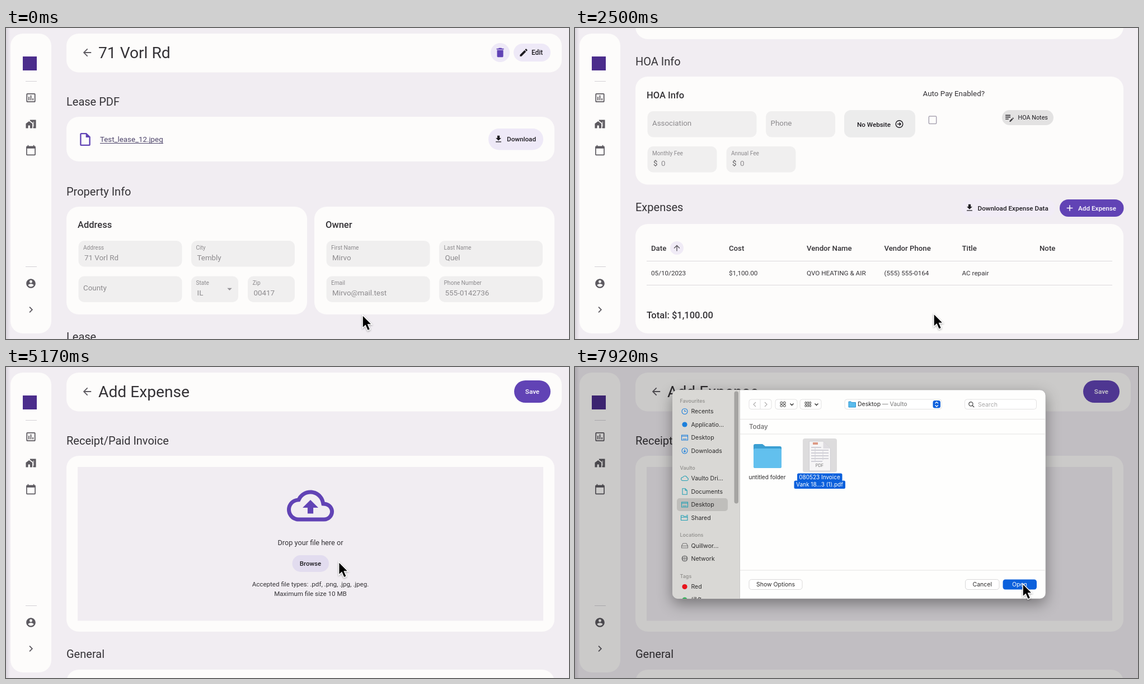
Write an HTML page that moves like this. It is 1006 by 557 pixels and loops after 8000 ms.

```html
<!DOCTYPE html>
<html lang="en">
<head>
<meta charset="utf-8">
<title>Lease manager</title>
<style>
  html, body { margin: 0; width: 100%; height: 100%; overflow: hidden; background: #f1edf2; }
  svg { display: block; width: 100vw; height: 100vh; font-family: Roboto, sans-serif; }
  text { white-space: pre; }
  .mid { text-anchor: middle; }
  .med { font-weight: 500; }
  #sheet { font-family: Inter, "Noto Sans CJK SC", "Noto Sans CJK", sans-serif; }
  .panel { filter: drop-shadow(0 9px 13px rgba(0, 0, 0, .38)); }
  #cursor { filter: drop-shadow(0 1.5px 1.5px rgba(0, 0, 0, .35)); }
</style>
</head>
<body>
<svg id="stage" viewBox="0 0 1006 557"></svg>
<script>
const PAGE = '#f1edf2', CARD = '#fdfcfb', FIELD = '#f0efef', INK = '#343236', GREY = '#8c8a8d',
      PURPLE = '#6143b5', LILAC = '#eee9f7', BLUE = '#0b60dc';

const ICONS = {
  chart: 'M9 17H7v-7h2v7zm4 0h-2V7h2v10zm4 0h-2v-4h2v4zm2 2H5V5h14v14zm0-16H5c-1.1 0-2 .9-2 2v14c0 1.1.9 2 2 2h14c1.1 0 2-.9 2-2V5c0-1.1-.9-2-2-2z',
  homes: 'M1 11v10h5v-6h4v6h5V11L8 6zM10 3v1.97l7 5V11h2v2h-2v2h2v2h-2v4h6V3H10zm9 6h-2V7h2v2z',
  calendar: 'M20 3h-1V1h-2v2H7V1H5v2H4c-1.1 0-2 .9-2 2v16c0 1.1.9 2 2 2h16c1.1 0 2-.9 2-2V5c0-1.1-.9-2-2-2zm0 18H4V8h16v13z',
  account: 'M12 2C6.48 2 2 6.48 2 12s4.48 10 10 10 10-4.48 10-10S17.52 2 12 2zm0 3c1.66 0 3 1.34 3 3s-1.34 3-3 3-3-1.34-3-3 1.34-3 3-3zm0 14.2c-2.5 0-4.71-1.28-6-3.22.03-1.99 4-3.08 6-3.08 1.99 0 5.97 1.09 6 3.08-1.29 1.94-3.5 3.22-6 3.22z',
  chevron: 'M10 6L8.59 7.41 13.17 12l-4.58 4.59L10 18l6-6z',
  back: 'M20 11H7.83l5.59-5.59L12 4l-8 8 8 8 1.41-1.41L7.83 13H20v-2z',
  trash: 'M6 19c0 1.1.9 2 2 2h8c1.1 0 2-.9 2-2V7H6v12zM19 4h-3.5l-1-1h-5l-1 1H5v2h14V4z',
  pencil: 'M3 17.25V21h3.75L17.81 9.94l-3.75-3.75L3 17.25zM20.71 7.04c.39-.39.39-1.02 0-1.41l-2.34-2.34c-.39-.39-1.02-.39-1.41 0l-1.83 1.83 3.75 3.75 1.83-1.83z',
  download: 'M19 9h-4V3H9v6H5l7 7 7-7zM5 18v2h14v-2H5z',
  event: 'M17 12h-5v5h5v-5zM16 1v2H8V1H6v2H5c-1.1 0-2 .9-2 2v14c0 1.1.9 2 2 2h14c1.1 0 2-.9 2-2V5c0-1.1-.9-2-2-2h-1V1h-2zm3 18H5V8h14v11z',
  note: 'M3 10h11v2H3v-2zm0-2h11V6H3v2zm0 8h7v-2H3v2zm15-3.1.7-.7c.4-.4 1-.4 1.4 0l.7.7c.4.4.4 1 0 1.4l-.7.7-2.1-2.1zm-.7.7L12 18.9V21h2.1l5.3-5.3-2.1-2.1z',
  cloud: 'M19.35 10.04C18.67 6.59 15.64 4 12 4 9.11 4 6.6 5.64 5.35 8.04 2.34 8.36 0 10.91 0 14c0 3.31 2.69 6 6 6h13c2.76 0 5-2.24 5-5 0-2.64-2.05-4.78-4.65-4.96zM19 18H6c-2.21 0-4-1.79-4-4 0-2.05 1.53-3.76 3.56-3.97l1.07-.11.5-.95C8.08 7.14 9.94 6 12 6c2.62 0 4.88 1.86 5.39 4.43l.3 1.5 1.53.11c1.56.1 2.78 1.41 2.78 2.96 0 1.65-1.35 3-3 3zM8 13h2.55v3h2.9v-3H16l-4-4z',
  file: 'M14 2H6c-1.1 0-2 .9-2 2v16c0 1.1.9 2 2 2h12c1.1 0 2-.9 2-2V8l-6-6zM6 20V4h7v5h5v11H6z',
  drop: 'M7 10l5 5 5-5z',
  up: 'M11 20V7.83l-5.59 5.59L4 12l8-8 8 8-1.41 1.41L13 7.83V20z',
  plus: 'M19 13h-6v6h-2v-6H5v-2h6V5h2v6h6z'
};

// All text is placed by the middle of its capitals.
const text = (x, y, s, size, fill = INK, cls = '') =>
  `<text x="${x}" y="${y + size * .355}" font-size="${size}" fill="${fill}" class="${cls}">${s.replace(/&/g, '&amp;')}</text>`;
const box = (x, y, w, h, r, fill, extra = '') =>
  `<rect x="${x}" y="${y}" width="${w}" height="${h}" rx="${r}" fill="${fill}" ${extra}/>`;
const icon = (name, x, y, k, fill = '#5d5a60') =>
  `<path transform="translate(${x} ${y}) scale(${k}) translate(-12 -12)" d="${ICONS[name]}" fill="${fill}" fill-rule="evenodd"/>`;
const line = (d, color, w = 1, extra = '') => `<path d="${d}" fill="none" stroke="${color}" stroke-width="${w}" ${extra}/>`;
const group = (id, body, dy = 0) => `<g id="${id}" transform="translate(0 ${dy})">${body}</g>`;
const card = (x, y, w, h) => box(x, y, w, h, 22, CARD);
const section = (y, s) => text(108, y, s, 20);
const heading = (x, y, s) => text(x, y, s, 16.5, INK, 'med');

function field(x, y, w, label, value, money) {
  let out = box(x, y, w, 46.5, 10, FIELD);
  if (value === undefined) return out + text(x + 8.5, y + 21, label, 13.35, GREY);
  out += text(x + 8.5, y + 12, label, 10.1, GREY);
  if (money) out += text(x + 10.5, y + 30, '$', 13.35, '#5c5a5d');
  return out + text(x + (money ? 24.5 : 10.5), y + 30, value, 13.35, GREY);
}

function service(y, name, first, chipW, note) {
  return heading(128, y, name) + field(129.5, y + 29, 195, first) + field(341, y + 29, 124, 'Phone') +
    box(481, y + 27, 127, 49, 12, '#ececec') + text(504, y + 52.5, 'No Website', 11.7, '#1d1b20', 'med') +
    `<circle cx="579.5" cy="${y + 52}" r="6.3" fill="none" stroke="#1d1b20" stroke-width="1.4"/>` +
    line(`M576 ${y + 52}h6m-2.6-2.7l2.7 2.7-2.7 2.7`, '#1d1b20', 1.4) +
    box(632.3, y + 38, 13.4, 13.4, 1.5, 'none', 'stroke="#aaa5b3" stroke-width="1.5"') +
    box(763, y + 27, chipW, 27, 13.5, '#e3e2e2') + icon('note', 776.5, y + 40.5, .82, '#3a383c') +
    text(791.5, y + 40.5, note, 10.8, '#1d1b20');
}

const autoPay = y => text(621.5, y - 3, 'Auto Pay Enabled?', 13.4);

function header(title, right) {
  return card(108, 10, 885, 69.5) + icon('back', 145, 44, .9) + text(165, 44, title, 28.2) + right;
}

function sidebar() {
  const glyphs = [['chart', 125, .9], ['homes', 172, .82], ['calendar', 219, .84], ['account', 457.5, .83], ['chevron', 504.5, .9]];
  return box(0, 0, 8, 557, 0, 'url(#edge)') + box(8, 10, 73, 537, 22, CARD) + box(30, 51, 25, 25, 0, '#4b2d8c') +
    line('M35 95.5h20M35 427.5h20', '#d3d0d5') + glyphs.map(([n, y, k]) => icon(n, 44.5, y, k)).join('');
}

function leasePage() {
  const street = '71 Vorl Rd';
  const pdf = section(132, 'Lease PDF') + card(108, 159, 872, 80) + icon('file', 141.5, 199.5, 1.16, PURPLE) +
    text(168, 199, 'Test_lease_12.jpeg', 13.3, '#4b4268') + line('M168 206.5h113', '#4b4268') +
    box(862, 180, 98, 38.5, 19, LILAC) + icon('download', 880, 199, .7, '#1d1b20') + text(895, 199, 'Download', 11.7, '#1d1b20', 'med');
  const property = section(292.5, 'Property Info') + card(108, 320, 430, 193) + card(551, 320, 429, 193) +
    heading(128, 352.5, 'Address') + heading(571, 352.5, 'Owner') +
    field(129.5, 381, 185, 'Address', street) + field(331, 381, 185, 'City', 'Tembly') +
    field(129.5, 444.5, 185, 'County') + field(331, 444.5, 84, 'State', 'IL') + field(432, 444.5, 84, 'Zip', '00417') +
    icon('drop', 399.5, 467.5, .85, '#98969a') +
    field(572.5, 381, 185, 'First Name', 'Mirvo') + field(774, 381, 185, 'Last Name', 'Quel') +
    field(572.5, 444.5, 185, 'Email', 'Mirvo@mail.test') + field(774, 444.5, 185, 'Phone Number', '555-0142736');
  const lease = section(156, 'Lease') + card(108, 183, 872, 194) + heading(128, 216, 'Lease') +
    field(129.5, 245, 265, 'Lease Start', '08/15/2024') + field(411.5, 245, 265, 'Lease End', '08/15/2025') +
    field(693.5, 245, 265.5, 'Due Date', '1') + icon('event', 378, 267.5, .83, '#858387') + icon('event', 660, 267.5, .83, '#858387') +
    field(129.5, 308.5, 124, 'Rent', '8888', true) + field(270.5, 308.5, 124, 'Security Deposit', '8888', true);
  const tenants = section(416, 'Tenants') + card(108, 444, 872, 130) + heading(128, 476.5, 'Tenant 1') +
    [['First Name', 'Tolvi'], ['Last Name', 'Ost'], ['Email', 'SorvKelm@mail.test'], ['Phone Number', '000-555-0147']]
      .map(([k, v], i) => field(129.5 + i * 211.4, 505, 195, k, v)).join('');
  const utilities = section(-73, 'Utilities') + card(108, -45, 872, 440) + autoPay(-12.5) +
    [['Electricity', 117], ['Water', 98], ['Gas', 89], ['Trash', 97]]
      .map(([n, w], i) => service(-12.5 + i * 103.5, n, 'Company', w, n + ' Notes')).join('');
  const cols = [136, 275, 414, 552.5, 691.5, 830];
  const row = (y, cells, size, cls) => cells.map((c, i) => text(cols[i], y, c, size, INK, cls)).join('');
  const end = section(60, 'HOA Info') + card(108, 87, 872, 193.5) + autoPay(120) +
    service(120, 'HOA Info', 'Association', 92, 'HOA Notes') +
    field(129.5, 212, 124, 'Monthly Fee', '0', true) + field(270.5, 212, 124, 'Annual Fee', '0', true) +
    section(320.5, 'Expenses') + box(690, 307, 168, 31, 15.5, '#f1ecf6') + icon('download', 705, 322, .7, '#1d1b20') +
    text(719.5, 322.5, 'Download Expense Data', 11.7, '#1d1b20', 'med') +
    box(866, 307, 114.5, 31, 15.5, PURPLE, 'id="add"') + icon('plus', 884, 322.5, .76, '#fff') +
    text(899, 322.5, 'Add Expense', 11.7, '#fff', 'med') +
    card(108, 351, 872, 196) + `<circle cx="182" cy="394" r="12" fill="#f0ebf6"/>` + icon('up', 182, 394, .68) +
    row(394, ['Date', 'Cost', 'Vendor Name', 'Vendor Phone', 'Title', 'Note'], 13.2, 'med') +
    row(439, ['05/10/2023', '$1,100.00', 'QVO HEATING & AIR', '(555) 555-0164', 'AC repair'], 11.7, '') +
    line('M128 417.5h832M128 460.5h832', '#dbd9dc') + heading(128, 514, 'Total: $1,100.00');
  const tools = `<circle cx="883" cy="44" r="17" fill="${LILAC}"/>` + icon('trash', 883, 44, .92, PURPLE) +
    box(907, 28, 66, 32, 16, LILAC) + icon('pencil', 925, 44, .74, '#1d1b20') + text(939, 44, 'Edit', 11.9, '#1d1b20', 'med');
  return group('scroll', pdf + property + group('lease', lease + tenants, 397) +
    group('utilities', utilities, 1083) + group('end', end, 1458)) + group('bar', header(street, tools));
}

function expensePage() {
  const save = box(908, 24, 65, 40, 20, PURPLE) + text(940.5, 44, 'Save', 11.7, '#fff', 'med mid');
  return header('Add Expense', save) + section(132, 'Receipt/Paid Invoice') + card(108, 159, 872, 315) +
    box(128, 179, 832, 275.5, 0, PAGE) + icon('cloud', 544, 248.5, 3.5, PURPLE) +
    text(544, 314, 'Drop your file here or', 12.7, INK, 'mid') +
    box(511.5, 337, 65.5, 30, 15, '#e2dcef', 'id="browse"') + text(544, 352, 'Browse', 11.5, '#1d1b20', 'med mid') +
    text(544, 389, 'Accepted file types: .pdf, .png, .jpg, .jpeg.', 11.6, INK, 'mid') +
    text(544, 405.5, 'Maximum file size 10 MB', 11.6, INK, 'mid') +
    section(514, 'General') + card(108, 542, 872, 80);
}

function fileSheet() {
  const dark = '#2b2a2a', faint = '#8f8e8b', sky = '#1b7fdc', teal = '#23a0b4';
  const shapes = {
    clock: 'M201 0a5 5 0 1 1-10 0a5 5 0 1 1 10 0M196-3v3h2.5',
    screen: 'M190.5-4.5h11v9h-11zM190.5-2.5h11M192.5 2.5h7',
    down: 'M201 0a5 5 0 1 1-10 0a5 5 0 1 1 10 0M196-2.8v5.2m-2-2l2 2 2-2',
    cloud: 'M192.5 4h7.5a2.7 2.7 0 0 0 .3-5.3a4 4 0 0 0-7.5-.7a3 3 0 0 0-.3 6z',
    page: 'M192-5.3h5l3.2 3.2v7.4h-8.2zM197-5.3v3.2h3.2',
    folder: 'M189.5 4.5v-8.5h4l1 1.5h6.5v7zM189.5-.7h11.5M199-4.5h3',
    drive: 'M190.5 0l2.5-4h6l2.5 4v4h-11zM190.5 .5h11',
    globe: 'M201 0a5 5 0 1 1-10 0a5 5 0 1 1 10 0M191 0h10M196-5v10M193.5-4q-2 4 0 8M198.5-4q2 4 0 8'
  };
  const item = (y, s, shape, color) => text(207.5, y, s, 10.5, dark) + (shape
    ? line(shapes[shape], color, 1.1, `transform="translate(0 ${y})"`)
    : `<circle cx="196" cy="${y}" r="4.6" fill="${color}"/>`);
  const label = (y, s) => text(187.5, y, s, 9, faint, 'med');
  const side = box(174, 41, 120.5, 374, 0, '#d9d8d5') + box(182, 235, 91, 23, 5, '#bfbebb') +
    label(61, 'Favourites') + item(79.5, 'Recents', 'clock', sky) + item(103, 'Applicatio...', '', sky) +
    item(126.5, 'Desktop', 'screen', sky) + item(150, 'Downloads', 'down', sky) +
    label(181, 'Vaulto') + item(199.5, 'Vaulto Dri...', 'cloud', teal) + item(223, 'Documents', 'page', teal) +
    item(246.5, 'Desktop', 'screen', teal) + item(270, 'Shared', 'folder', teal) +
    label(301, 'Locations') + item(320, 'Quillwor...', 'drive', '#777') + group('network', item(343, 'Network', 'globe', '#777')) +
    group('tags', label(375, 'Tags') + item(393.5, 'Red', '', '#e8141c') + item(417, '绿色', '', '#2fb457') + item(440, '红色', '', '#e8141c')) +
    box(284.5, 43.5, 7.5, 201, 3.7, '#a5a4a2', 'id="thumb"');
  const button = (x, w, s) => box(x, 380.5, w, 18, 4.5, '#fff', 'stroke="#d9d8d8"') + text(x + w / 2, 389.5, s, 10.5, dark, 'mid');
  const frame = 'stroke="#e2e1e1"';
  const grid = (x, n, step, size) => Array.from({ length: n * 2 }, (_, i) =>
    box(x + i % n * step, 62.5 + Math.floor(i / n) * 5, size, 3.6, .5, 'none', 'stroke="#444"')).join('');
  const tools = box(311, 58, 40, 17.5, 4, '#fff', frame) + line('M331 58v17.5', '#e2e1e1') +
    line('M323 63l-4 4 4 4M339 63l4 4-4 4', '#b0afaf', 1.2) +
    box(358, 58, 39, 17.5, 4, '#fff', frame) + box(402, 58, 38, 17.5, 4, '#fff', frame) +
    grid(367, 2, 5.5, 3.6) + grid(411, 3, 4, 2.5) + line('M384.5 65.5l3 3 3-3M428.5 65.5l3 3 3-3', '#333', 1.4) +
    box(482, 58, 173, 17.5, 4, '#fff', frame) + line('M489 62h4l1.5 1.5h7v8.5h-12.5z', '#2b93cf', 1, 'style="fill:#5bbcec"') +
    text(505, 66.5, `Desktop<tspan fill="#777"> — Vaulto</tspan>`, 10.5, dark) +
    box(639.5, 60, 13.5, 13.5, 3.5, BLUE) + line('M643.5 65.3l2.7-2.7 2.7 2.7M643.5 68.3l2.7 2.7 2.7-2.7', '#fff', 1.3) +
    box(696.5, 58, 128, 17.5, 4, '#fff', frame) + line('M711 66.3a3.6 3.6 0 1 1-7.2 0a3.6 3.6 0 1 1 7.2 0M710.2 69l3 3', '#444', 1.2) +
    text(720, 67, 'Search', 10.5, '#a9a8a8');
  const folder = `<path d="M319 141q0-3 3-3h13l5 4h26q3 0 3 3v33q0 3-3 3h-44q-3 0-3-3z" fill="#3b9fd2"/>` + box(319, 146, 50, 35, 3, '#62c0ee');
  const doc = `<path d="M418.5 133h25l13 13v40h-38z" fill="#f6f5f6" stroke="#cfcdd2"/><path d="M443.5 133v13h13z" fill="#dedce0"/>` +
    box(425, 135, 9, 4, 0, '#dd9a85') + line('M422 144h18M422 149h31M422 154h31M422 159h31M422 164h31M422 169h20', '#c3c2cc', 1.5) +
    line('M429 144v24M443 149v18', '#d4d3da') + text(437, 176, 'PDF', 7.5, '#777', 'mid');
  return `<clipPath id="round">${box(174, 41, 667, 374, 10, '#000')}</clipPath>` +
    box(174, 41, 667, 374, 10, '#fefefd', 'class="panel" stroke="#aaa8aa" stroke-width=".6"') +
    `<g clip-path="url(#round)">${side}${line('M294.5 41v374', '#cbcac8')}${line('M295 93.5h546M295 120h546M295 364h546', '#e4e3e2')}</g>` +
    tools + text(311, 106.5, 'Today', 11.5, '#6d6c6c', 'med') +
    group('picked', box(407, 128, 61, 60.5, 4, '#dddcdd') + box(397, 190.5, 80.5, 14, 2.5, BLUE) + box(391.5, 203.5, 91.5, 14.5, 2.5, BLUE)) +
    folder + text(343.5, 197.5, 'untitled folder', 10.1, dark, 'mid') +
    group('waiting', text(344.5, 209.5, 'Waiting to Upload', 8.5, '#a3a2a2', 'mid')) + doc +
    group('fileName', text(437, 197.5, '080523 Invoice', 10, 'inherit', 'mid') + text(437, 210.5, 'Vank 18...3 (1).pdf', 10, 'inherit', 'mid')) +
    button(311, 95, 'Show Options') + button(697.5, 60.5, 'Cancel') +
    box(764.5, 380.5, 60.5, 18, 4.5, BLUE, 'id="openBox"') + group('openText', text(794.5, 389.5, 'Open', 10.5, 'inherit', 'mid'));
}

const cursor = `<path id="arrow" d="M0 0V23.5L5.2 18.7 9.2 28 13.7 26 9.8 17H16.8z" stroke="#fff" stroke-width="1.5"/>
  <g id="hand" stroke="#111" stroke-width="1.5" stroke-linejoin="round"><path fill="#fff" d="M-1.5 2.5q1-3.5 4-1.5l4.5 9q2.5-2 4 .5q2.5-1.5 4 1q3-1 3.5 2l1.2 6q.5 3-1 6l-10 2.5-10.5-9q-3-3.5 .5-4.2l5 2.5z"/><path d="M8.5 17l2 5M11.7 16l2 5M15 15.5l1.5 4.5"/></g>`;

document.getElementById('stage').innerHTML =
  `<defs><linearGradient id="edge"><stop stop-color="#dad5dd"/><stop offset="1" stop-color="${PAGE}"/></linearGradient></defs>` +
  box(0, 0, 1006, 557, 0, PAGE) + group('leasePage', leasePage()) + group('expensePage', expensePage()) + sidebar() +
  box(0, 0, 1006, 557, 0, '#000', 'id="dim"') + group('sheet', fileSheet()) + group('cursor', cursor);

const LOOP = 8000, STEP = 1000 / 12;
const SCROLL_START = 866.4, SCROLL_TIME = 1336, SCROLL_END = 1458;
const SWITCH = 4160, SHEET = 6030, REFRESH = 6600, PICK = 7150;
const MOVES = [[2420, 637, 514], [3500, 932, 331], [4450, 932, 331], [5400, 539, 352], [6600, 539, 352],
               [7050, 437, 158], [7220, 437, 158], [7720, 800, 388]];

const clamp = v => Math.min(1, Math.max(0, v));
const ease = v => (1 - Math.cos(Math.PI * clamp(v))) / 2;
const el = id => document.getElementById(id);
const set = (id, name, value) => el(id).setAttribute(name, value);
const show = (id, on) => set(id, 'visibility', on ? 'inherit' : 'hidden');
const shift = (id, x, y) => set(id, 'transform', `translate(${x} ${y})`);

function pointer(t) {
  let [, x, y] = MOVES[0];
  for (let i = 1; i < MOVES.length; i++) {
    const [t0, x0, y0] = MOVES[i - 1], [t1, x1, y1] = MOVES[i];
    if (t < t0) break;
    const p = ease((t - t0) / (t1 - t0));
    x = x0 + (x1 - x0) * p;
    y = y0 + (y1 - y0) * p;
  }
  return [x, y];
}

function render(t) {
  const scroll = SCROLL_END * ease((t - SCROLL_START) / SCROLL_TIME);
  shift('scroll', 0, -Math.round(scroll));
  shift('bar', 0, Math.min(0, 800 - scroll));
  show('leasePage', t < SWITCH);
  show('expensePage', t >= SWITCH);

  const onAdd = t > 3380 && t < SWITCH, onBrowse = t > 5250;
  set('add', 'fill', onAdd ? '#45287f' : PURPLE);
  set('browse', 'fill', onBrowse ? '#8d8a92' : '#e2dcef');

  const p = clamp((t - SHEET) / 400);
  set('dim', 'opacity', .2 * p);
  set('sheet', 'opacity', p ** .8);
  shift('sheet', 0, -37 * (1 - p));
  const fresh = t >= REFRESH, picked = t >= PICK;
  show('network', fresh);
  shift('tags', 0, fresh ? 0 : -23.5);
  set('thumb', 'height', fresh ? 201 : 208);
  show('waiting', !fresh);
  show('picked', picked);
  show('openBox', picked);
  set('fileName', 'fill', picked ? '#fff' : '#2b2a2a');
  set('openText', 'fill', picked ? '#fff' : '#b9b8b8');

  const hand = onAdd || (onBrowse && t < 6080);
  shift('cursor', ...pointer(t));
  show('arrow', !hand);
  show('hand', hand);
}

// The picture advances twelve times a second.
const start = performance.now();
function tick() {
  const t = (performance.now() - start) % LOOP;
  render(Math.floor((t + 5) / STEP) * STEP % LOOP);
  requestAnimationFrame(tick);
}
tick();
</script>
</body>
</html>
```
